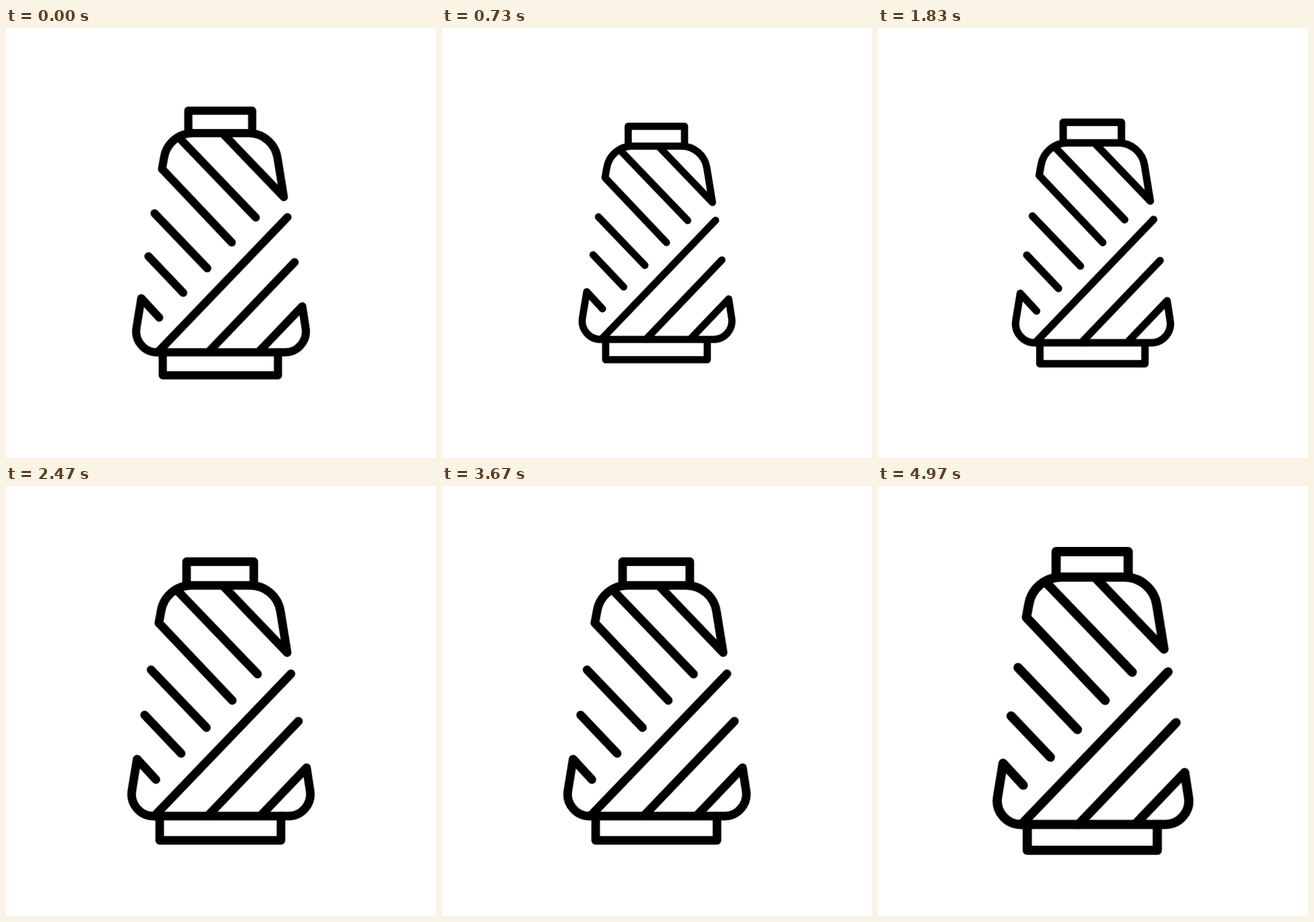
Recreate the animation shown at these times as an HTML page without scripts. Size 748x748 px, loop 5 s.

```html
<!DOCTYPE html>
<html lang="en">
<head>
<meta charset="utf-8">
<title>Thread spool</title>
<style>
  html, body { margin: 0; width: 100%; height: 100%; overflow: hidden; background: #fff; }
  svg { display: block; width: 100%; height: 100%; }
  .spool {
    fill: none;
    stroke: #000;
    stroke-width: 16;
    stroke-linecap: round;
    stroke-linejoin: round;
    transform-origin: 374px 374px;
    animation: pulse 5s linear infinite;
  }
  /* 400 ms linear swell, 800 ms quadratic ease-out shrink; the loop cuts in mid-swell */
  @keyframes pulse {
    0% { transform: scale(.888); }
    4%, 28%, 52%, 76% {
      transform: scale(1.0225);
      animation-timing-function: cubic-bezier(.3333, .6667, .6667, 1);
    }
    20%, 44%, 68%, 92% {
      transform: scale(.7535);
      animation-timing-function: linear;
    }
    100% { transform: scale(1.0225); }
  }
</style>
</head>
<body>
<svg viewBox="0 0 748 748">
  <g class="spool">
    <!-- cap and base -->
    <path d="M310 155V115H435V155"/>
    <path d="M260 588V633H485.5V588"/>
    <!-- body -->
    <path d="M395 373L258.5 229L262.5 207A57 57 0 0 1 319 159H428A57 57 0 0 1 484.5 207L497 284L377 159"/>
    <path d="M253 520L218 482L208.5 540A41 41 0 0 0 249 588H499A41 41 0 0 0 539.5 540L533 498L447 588"/>
    <!-- thread -->
    <path d="M295 171L442 324M244 316L347 423.5M232 400L300 471.5"/>
    <path d="M504 323.5L250 588M518 411.5L349 588"/>
  </g>
</svg>
</body>
</html>
```
